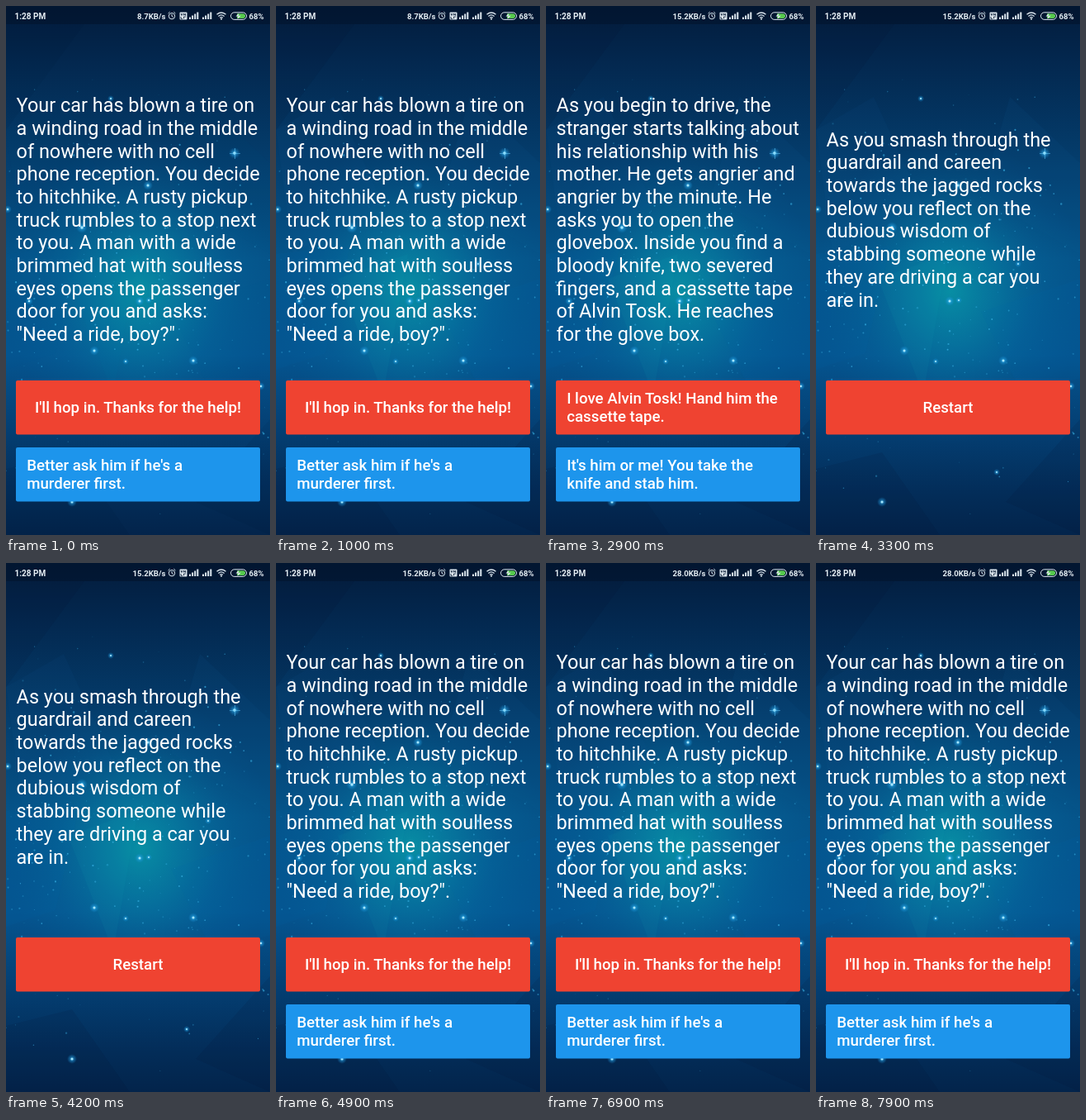
Write an HTML page that moves like this. It is 320 by 640 pixels and loops after 8000 ms.

```html
<!DOCTYPE html>
<html lang="en">
<head>
<meta charset="utf-8">
<title>Hitchhike story</title>
<style>
  html, body { margin: 0; width: 100%; height: 100%; overflow: hidden; background: #03234a; }
  svg { display: block; width: 100%; height: 100%; }
  text { font-family: Roboto, "Noto Sans", sans-serif; fill: #fff; white-space: pre; }
  .story { font-size: 23.45px; }
  .label { font-size: 18.7px; font-weight: 500; }
  .status { font-size: 9.6px; font-weight: 600; fill: #e6edf3; }
  .line { fill: none; stroke: #dce6ee; }
  .fill { fill: #dce6ee; }
</style>
</head>
<body>
<svg id="stage" viewBox="0 0 320 640">
  <defs>
    <linearGradient id="sky" x1="0" y1="0" x2="0" y2="1">
      <stop offset="0" stop-color="#031c3c"/>
      <stop offset=".1" stop-color="#03274e"/>
      <stop offset=".28" stop-color="#043c6b"/>
      <stop offset=".48" stop-color="#05548a"/>
      <stop offset=".66" stop-color="#055590"/>
      <stop offset=".8" stop-color="#043f73"/>
      <stop offset=".92" stop-color="#032d59"/>
      <stop offset="1" stop-color="#03244b"/>
    </linearGradient>
    <radialGradient id="core" gradientUnits="userSpaceOnUse" cx="0" cy="0" r="1"
      gradientTransform="translate(163 345) scale(165 185)">
      <stop offset="0" stop-color="#0898a8" stop-opacity=".85"/>
      <stop offset=".35" stop-color="#0788a8" stop-opacity=".55"/>
      <stop offset=".7" stop-color="#0673a4" stop-opacity=".2"/>
      <stop offset="1" stop-color="#0568a0" stop-opacity="0"/>
    </radialGradient>
    <radialGradient id="glow">
      <stop offset="0" stop-color="#7edcff"/>
      <stop offset=".3" stop-color="#2eafef" stop-opacity=".75"/>
      <stop offset="1" stop-color="#1389d4" stop-opacity="0"/>
    </radialGradient>
  </defs>
  <rect width="320" height="640" fill="url(#sky)"/>
  <rect width="320" height="640" fill="url(#core)"/>
  <g id="facets"></g>
  <g id="stars"></g>
  <rect width="320" height="22" fill="#021126" opacity=".5"/>

  <text class="status" x="10.5" y="15.5" style="font-size:10px">1:28 PM</text>
  <text class="status" id="speed" x="193.5" y="15.5" text-anchor="end"></text>
  <g class="line">
    <circle cx="201" cy="12.2" r="3.7"/>
    <path d="M201 10v2.4l1.7 1M196.6 9l2-1.9M205.4 9l-2-1.9"/>
  </g>
  <rect class="fill" x="210.5" y="7.5" width="9" height="9" rx="1"/>
  <path d="M212 9l1 2.5 1-2.5M215.5 11.5v-2.5l2 2.5v-2.5M212 13v2.4h2M215.5 15.4v-2.4h2.5" fill="none" stroke="#0a1b34" stroke-width=".8"/>
  <g id="bars" class="fill"></g>
  <g class="line" stroke-width="1.3">
    <path d="M255.5 10.3q5.5-4.6 11 0M257.4 12.4q3.6-3 7.2 0M259.2 14.3q1.8-1.4 3.6 0"/>
  </g>
  <circle class="fill" cx="261" cy="15.8" r="1"/>
  <rect class="line" x="272.5" y="7.8" width="19" height="8.6" rx="4.3"/>
  <path d="M280 9.3h7.3a2.8 2.8 0 0 1 0 5.6h-7.3z" fill="#56c94c"/>
  <path class="fill" d="M282.5 8.5l-4 4h3l-1 3.4 4.2-4.2h-3z"/>
  <text class="status" x="294.5" y="15.5">68%</text>
  <g id="pages"></g>
</svg>
<script>
const LOOP = 8000;
const RED = "#ef4331", BLUE = "#1d95ec";
const byId = id => document.getElementById(id);

function add(parent, tag, attrs, text) {
  const el = document.createElementNS("http://www.w3.org/2000/svg", tag);
  for (const key in attrs) el.setAttribute(key, attrs[key]);
  if (text) el.textContent = text;
  parent.append(el);
  return el;
}

const stories = [
  {
    text: `Your car has blown a tire on
a winding road in the middle
of nowhere with no cell
phone reception. You decide
to hitchhike. A rusty pickup
truck rumbles to a stop next
to you. A man with a wide
brimmed hat with soulless
eyes opens the passenger
door for you and asks:
"Need a ride, boy?".`,
    choices: ["I'll hop in. Thanks for the help!", "Better ask him if he's a\nmurderer first."]
  },
  {
    text: `As you begin to drive, the
stranger starts talking about
his relationship with his
mother. He gets angrier and
angrier by the minute. He
asks you to open the
glovebox. Inside you find a
bloody knife, two severed
fingers, and a cassette tape
of Alvin Tosk. He reaches
for the glove box.`,
    choices: ["I love Alvin Tosk! Hand him the\ncassette tape.", "It's him or me! You take the\nknife and stab him."]
  },
  {
    text: `As you smash through the
guardrail and careen
towards the jagged rocks
below you reflect on the
dubious wisdom of
stabbing someone while
they are driving a car you
are in.`,
    choices: ["Restart"]
  }
];

// Lines are centred vertically around a middle baseline.
function addLines(parent, text, cls, x, middle, pitch, anchor = "start") {
  const lines = text.split("\n");
  lines.forEach((line, i) => add(parent, "text", {
    class: cls, x, y: middle + (i - (lines.length - 1) / 2) * pitch, "text-anchor": anchor
  }, line));
}

function addButton(parent, label, i) {
  const y = i ? 534 : 453;
  add(parent, "rect", { x: 12, y, width: 296, height: 65.5, rx: 2, fill: i ? BLUE : RED });
  const wraps = label.includes("\n");
  addLines(parent, label, "label", wraps ? 25.2 : 160, y + 39.1, 22, wraps ? "start" : "middle");
}

const pages = stories.map(story => {
  const page = add(byId("pages"), "g", {});
  addLines(page, story.text, "story", 12.6, 266.6, 27.7);
  story.choices.forEach((label, i) => addButton(page, label, i));
  return page;
});

const facets = [
  ["0,22 95,22 0,150", "#000b26", .1],
  ["235,110 320,190 320,300 200,230", "#0d5c97", .1],
  ["0,150 70,110 130,240 20,300", "#0f609c", .08],
  ["0,300 90,290 60,420 0,440", "#0468a4", .1],
  ["75,330 160,300 130,470", "#15a3b2", .08],
  ["200,370 320,330 320,450 250,470", "#0568a6", .1],
  ["0,560 80,540 150,640 0,640", "#000b2a", .1],
  ["230,600 320,500 320,640", "#000e2e", .1]
];
for (const [points, fill, opacity] of facets) add(byId("facets"), "polygon", { points, fill, opacity });

let seed = 29;
const random = () => (seed = (seed * 16807) % 2147483647) / 2147483647;
const sky = byId("stars");
for (let i = 0; i < 240; i++) {
  const x = random() * 320, y = 70 + (random() + random()) * 285;
  add(sky, "circle", { cx: x, cy: y, r: .4 + random() * .8, fill: "#41bdf0", opacity: .15 + random() * .5 });
}
const bright = [
  [277, 178, 7], [172, 217, 6], [92, 268, 7], [162, 357, 6], [173, 356, 4],
  [107, 417, 6], [227, 429, 6], [80, 600, 6], [127, 112, 4], [309, 460, 5],
  [145, 430, 4], [28, 357, 5], [2, 246, 5], [245, 312, 4], [62, 510, 4], [219, 564, 4]
];
for (const [cx, cy, r] of bright) {
  add(sky, "circle", { cx, cy, r, fill: "url(#glow)", opacity: .75 });
  add(sky, "circle", { cx, cy, r: r / 4, fill: "#a5e6ff" });
}
add(sky, "path", { d: "M271 178.5h13M277.5 172v13", stroke: "#69cfff", "stroke-width": .7, opacity: .7 });

for (const x of [222, 238]) {
  for (let i = 0; i < 4; i++) {
    const h = 2.5 + i * 2;
    add(byId("bars"), "rect", { x: x + i * 3.1, y: 16 - h, width: 2, height: h });
  }
}

// [start time, value]
const pageSteps = [[0, 0], [1600, 1], [3100, 2], [4600, 0]];
const speedSteps = [[0, "8.7KB/s"], [2000, "15.2KB/s"], [5300, "28.0KB/s"]];
const valueAt = (steps, t) => steps.filter(step => step[0] <= t).pop()[1];

function draw() {
  const t = performance.now() % LOOP;
  const current = valueAt(pageSteps, t);
  pages.forEach((page, i) => page.setAttribute("visibility", i === current ? "visible" : "hidden"));
  byId("speed").textContent = valueAt(speedSteps, t);
  const sharpen = Math.min(1, Math.max(0, (Math.floor(t / 100) - 2) / 8));
  byId("facets").setAttribute("opacity", .45 + .55 * sharpen);
  requestAnimationFrame(draw);
}
draw();
</script>
</body>
</html>
```
